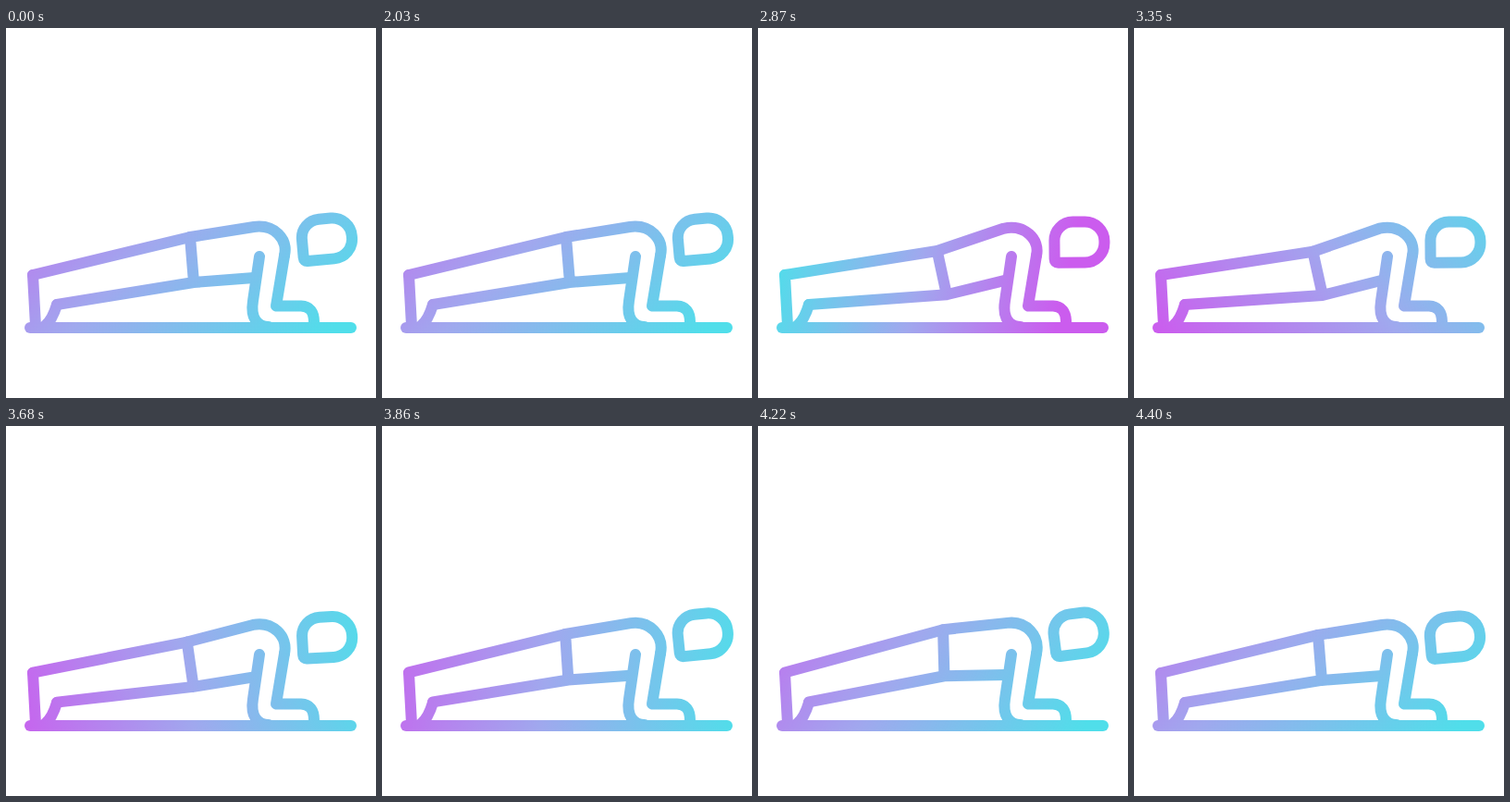
Animation of 400x400 px, one loop 4.43 s. Source, as an HTML page without scripts:

```html
<!DOCTYPE html>
<html lang="en">
<head>
<meta charset="utf-8">
<title>Push-up</title>
<style>
  html, body { margin: 0; width: 100%; height: 100%; overflow: hidden; background: #fff; }
  svg { display: block; width: 100%; height: 100%; }

  .lines { fill: none; stroke: #fff; stroke-width: 12; stroke-linecap: round; stroke-linejoin: round; }

  /* Each moving part has three poses, all on the same timing */
  .back {
    --rest: path("M29 267L199 226 268 215C290 212 305 228 301 246");
    --low: path("M29 267L193 243 265 217C288 212 305 228 301 246");
    --high: path("M29 266L201 215 271 211C290 209 305 226 301 246");
  }
  .belly {
    --rest: path("M199 226L203 275M55 299L203 275 268 270");
    --low: path("M193 243L204 290M55 299L204 290 268 273");
    --high: path("M201 215L200 266M55 298L200 266 268 268");
  }
  .head {
    --rest: translate(347px, 228px) rotate(-5deg);
    --low: translate(347.5px, 232px) rotate(0deg);
    --high: translate(346.5px, 221px) rotate(-9deg);
  }
  .back, .belly { d: var(--rest); animation: bend 4.43s infinite; }
  .head { animation: nod 4.43s infinite; }
  .tint { animation: turn 4.43s linear infinite; }

  @keyframes bend {
    0% { d: var(--rest); }
    45.8% { d: var(--rest); animation-timing-function: cubic-bezier(.4, .4, .6, 1); }
    72.5% { d: var(--low); animation-timing-function: cubic-bezier(.6, .1, .8, .8); }
    91.6% { d: var(--high); animation-timing-function: linear; }
    99.4%, 100% { d: var(--rest); }
  }
  @keyframes nod {
    0% { transform: var(--rest); }
    45.8% { transform: var(--rest); animation-timing-function: cubic-bezier(.4, .4, .6, 1); }
    72.5% { transform: var(--low); animation-timing-function: cubic-bezier(.6, .1, .8, .8); }
    91.6% { transform: var(--high); animation-timing-function: linear; }
    99.4%, 100% { transform: var(--rest); }
  }

  /* The colour axis turns once around the figure, tightening near the top */
  @keyframes turn {
    0%, 45.8% { transform: translate(185px, 210px) rotate(45deg) scale(1); }
    56.7% { transform: translate(185px, 210px) rotate(96deg) scale(.63); }
    75.6% { transform: translate(185px, 210px) rotate(320deg) scale(1); }
    87.1% { transform: translate(185px, 210px) rotate(367deg) scale(1.06); }
    99.3%, 100% { transform: translate(185px, 210px) rotate(405deg) scale(1); }
  }
</style>
</head>
<body>
<svg viewBox="0 0 400 400">
  <defs>
    <linearGradient id="colours" gradientUnits="userSpaceOnUse" x1="-200" y1="0" x2="200" y2="0">
      <stop offset="0" stop-color="#cb5cee"/>
      <stop offset=".5" stop-color="#a0a8ee"/>
      <stop offset="1" stop-color="#50deea"/>
    </linearGradient>

    <mask id="figure" maskUnits="userSpaceOnUse" x="0" y="0" width="400" height="400">
      <g class="lines">
        <path class="ground" d="M26 324H373"/>
        <path class="foot" d="M32 322L29 267M42 322Q50 316 55 299"/>
        <path class="arm" d="M301 246L292 300.5H319Q333 301 333 318M274 247L267 295C264 314 272 323 284 323"/>
        <path class="back"/>
        <path class="belly"/>
        <path class="head" d="M-23 22Q-27 22 -27 18V-2A20 20 0 0 1-7 -22H6A21 21 0 0 1 27 -1V1A21 21 0 0 1 6 22Z"/>
      </g>
    </mask>
  </defs>

  <g mask="url(#figure)">
    <rect class="tint" x="-700" y="-700" width="1400" height="1400" fill="url(#colours)"/>
  </g>
</svg>
</body>
</html>
```
